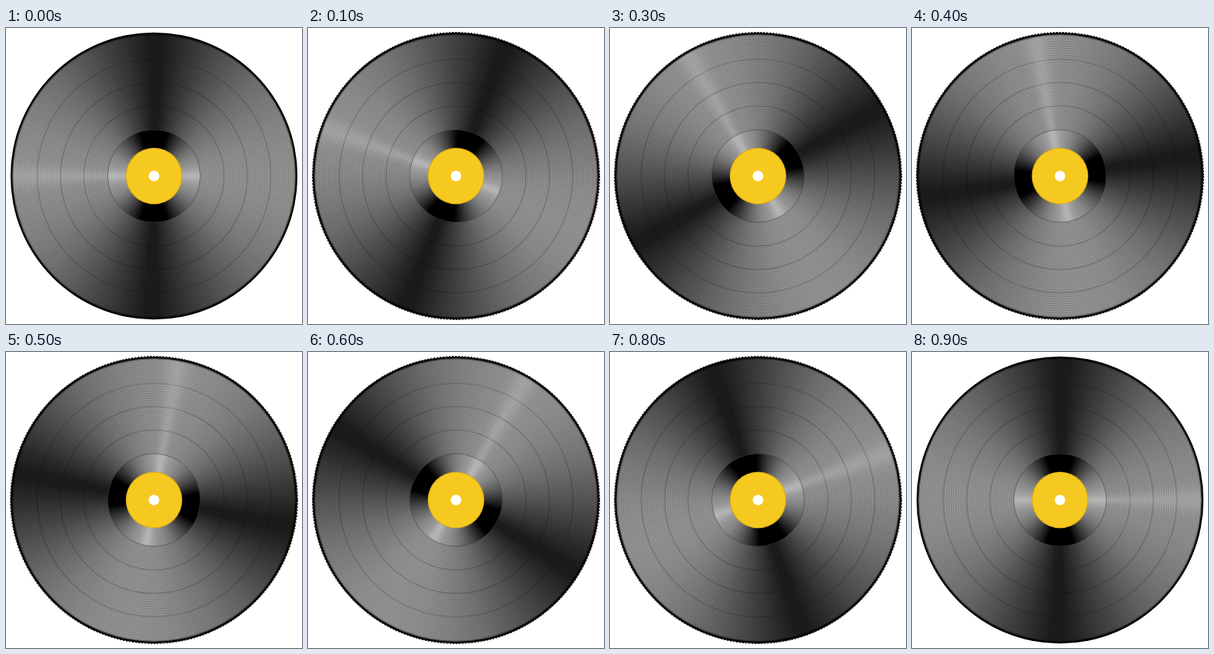
Animation, 380 px wide and 380 px high, one loop 1000 ms. Source, as an HTML page with a canvas:

```html
<!DOCTYPE html>
<html lang="en">
<head>
<meta charset="utf-8">
<title>Spinning record</title>
<style>
  html, body { margin: 0; width: 100%; height: 100%; overflow: hidden; background: #fff; }
  canvas { display: block; width: 380px; height: 380px; }
</style>
</head>
<body>
<canvas id="stage" width="380" height="380"></canvas>
<script>
const ctx = document.getElementById('stage').getContext('2d');
const C = 190, TAU = Math.PI * 2;
const STEP_MS = 100, STEPS = 10, STEP_DEG = 20;

const rad = deg => deg * Math.PI / 180;
const bump = (x, mid, width) => Math.exp(-(((x - mid) / width) ** 2));

// 0 inside the dark wedge around the vertical, rising to 1 at the horizontal
function rise(deg, wedge) {
  return Math.max(0, (Math.abs(Math.sin(rad(deg))) - wedge) / (1 - wedge));
}

// Grey level by angle, in degrees clockwise from the top
const vinyl = deg => 28 + 118 * rise(deg - 1, 0.05) + 20 * bump(deg, 270, 5);
const core = deg => 155 * rise(deg, 0.3) + 25 * (bump(deg, 90, 8) + bump(deg, 270, 8));

function sheen(level, turn) {
  const g = ctx.createConicGradient(rad(turn - 90), C, C);
  for (let deg = 0; deg <= 360; deg += 2) {
    const v = Math.round(level(deg));
    g.addColorStop(deg / 360, `rgb(${v},${v},${v})`);
  }
  return g;
}

function disc(r, fill) {
  ctx.beginPath();
  ctx.arc(C, C, r, 0, TAU);
  ctx.fillStyle = fill;
  ctx.fill();
}

function ring(r, width, stroke, dash = []) {
  ctx.beginPath();
  ctx.arc(C, C, r, 0, TAU);
  ctx.setLineDash(dash);
  ctx.lineWidth = width;
  ctx.strokeStyle = stroke;
  ctx.stroke();
}

function draw(ms) {
  const turn = Math.floor(ms / STEP_MS) % STEPS * STEP_DEG;
  ctx.fillStyle = '#fff';
  ctx.fillRect(0, 0, 380, 380);

  disc(184.2, '#000');
  // The rim looks ragged whenever the disc is off its upright pose
  if (turn % 180) ring(184.5, 1, '#000', [2, 2]);
  disc(182, sheen(vinyl, turn));
  ring(181.5, 1.5, 'rgba(0,0,0,.5)');

  for (let r = 62; r < 181; r += 3) ring(r, 1, 'rgba(0,0,0,.1)');
  for (let r = 90; r <= 150; r += 30) ring(r, 1.2, 'rgba(0,0,0,.2)');

  disc(59.5, sheen(core, turn));
  ring(59.5, 1, 'rgba(60,60,60,.6)');

  disc(36.3, '#d9aa18');
  disc(35.2, '#f5c91f');
  disc(6.8, '#fff');
}

function tick(now) {
  draw(now);
  requestAnimationFrame(tick);
}
draw(0);
requestAnimationFrame(tick);
</script>
</body>
</html>
```
